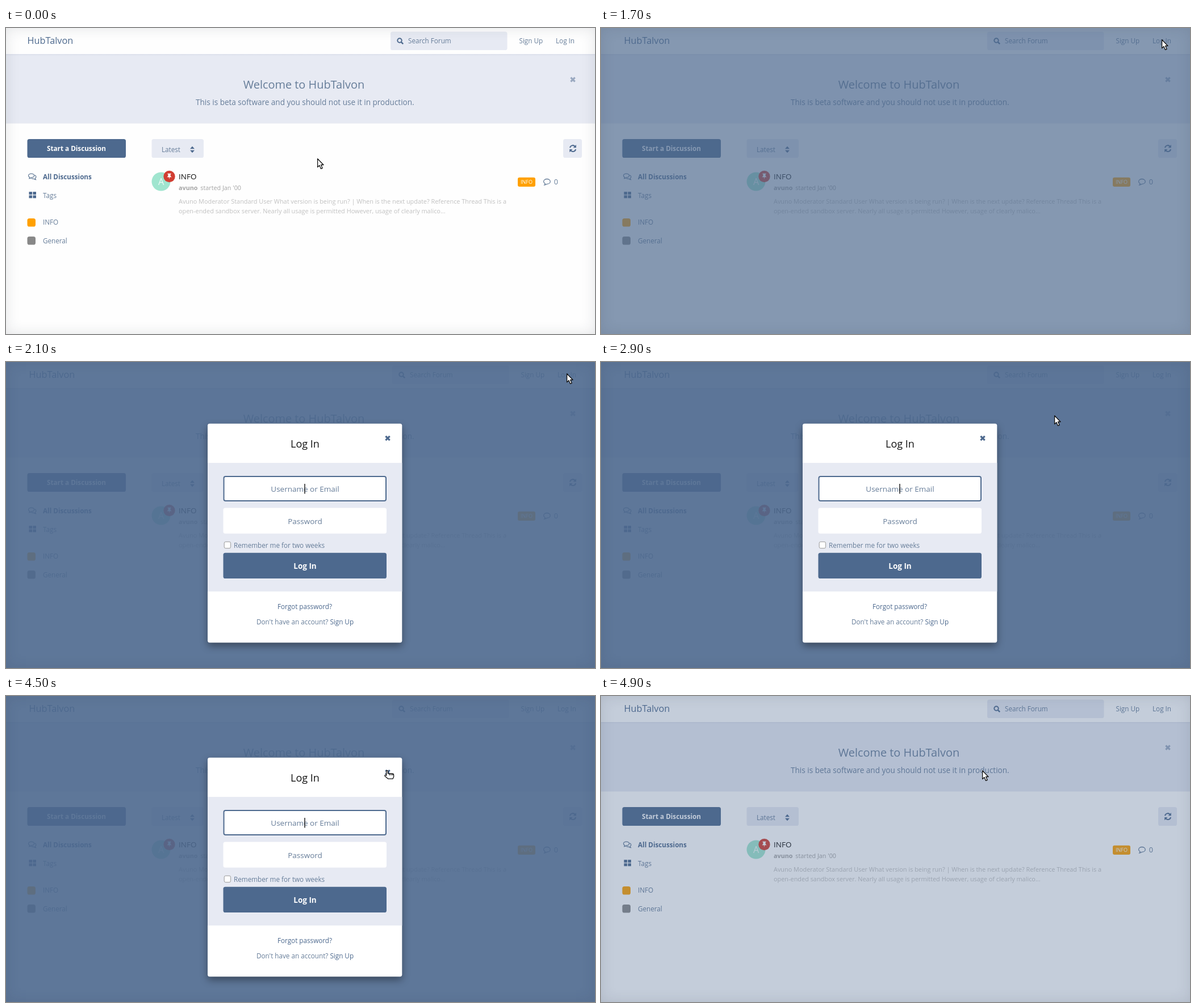
An HTML page that plays this animation: 1037 px wide and 540 px high, repeating every 5 s.

```html
<!DOCTYPE html>
<html lang="en">
<head>
<meta charset="utf-8">
<title>Forum log in</title>
<style>
html, body { margin: 0; width: 100%; height: 100%; overflow: hidden; background: #fefefe }
svg { position: absolute; left: 0; top: 0; width: 1037px; height: 540px }
#edge { position: absolute; left: 0; top: 0; width: 1037px; height: 540px; box-shadow: inset 0 0 24px rgba(35,45,60,.12) }
text { font: 11.7px "Open Sans", sans-serif; fill: #667d99 }
.b { font-weight: 700 }
.m { text-anchor: middle }
.p { fill: #4d698e }
.w { fill: #fff }
.k { fill: #111 }
.s { font-size: 10.8px; fill: #a4a4a4 }
.x { font-size: 10.9px; fill: #c1c1c1 }
.l { font-size: 13.5px }
.c { fill: #e7eaf3 }
.line { fill: none; stroke: #667d99; stroke-width: 1.3 }
#modal { transform-origin: 526px 302px }
#card { filter: drop-shadow(0 6px 7px rgba(0,0,0,.38)) }
</style>
</head>
<body>
<svg viewBox="0 0 1037 540">
  <defs>
    <path id="times" d="M-3.6-3.6 3.6 3.6M3.6-3.6-3.6 3.6" stroke="#4d698e" stroke-width="3.2"/>
    <linearGradient id="under" x2="0" y2="1">
      <stop stop-color="#405070" stop-opacity=".08"/><stop offset="1" stop-color="#405070" stop-opacity="0"/>
    </linearGradient>
  </defs>

  <rect class="c" y="46" width="1037" height="122.5"/>
  <rect y="46" width="1037" height="3" fill="url(#under)"/>
  <g id="head">
    <text class="p" x="37.5" y="28" style="font-size:16.3px">HubTalvon</text>
    <rect class="c" x="677" y="6.5" width="205.5" height="32.5" rx="3.6"/>
    <circle cx="693" cy="22" r="3.7" fill="none" stroke="#4d698e" stroke-width="2"/>
    <path d="M695.8 24.8l3.4 3.4" stroke="#4d698e" stroke-width="2.4"/>
    <text x="708" y="27.3">Search Forum</text>
    <text x="903.5" y="27.3">Sign Up</text>
    <text x="968" y="27.3">Log In</text>
  </g>
  <text x="417.8" y="106.5" style="font-size:19.9px">Welcome to HubTalvon</text>
  <text x="334" y="136" style="font-size:13.55px">This is beta software and you should not use it in production.</text>
  <use href="#times" x="998" y="91" opacity=".5"/>

  <rect class="p" x="37.5" y="196" width="173.5" height="33" rx="3.6"/>
  <text class="b m w" x="124" y="217">Start a Discussion</text>
  <path class="line" d="M41 265.5q.6-1 .8-2q-2.2-1-2.2-3c0-2 2.4-3.4 5-3.4s5 1.4 5 3.4-2.4 3.4-5 3.4q-1.6 1.4-3.6 1.6zM50.5 259.6q2.4 1 2.4 3.1 0 1.6-1.6 2.6 0 1 1 2.2-2 0-3.6-1.4-2.4.2-4-.7"/>
  <text class="b p" x="65" y="267.4">All Discussions</text>
  <path class="p" d="M40.5 289h5.6v5h-5.6zM47.4 289h5.6v5h-5.6zM40.5 295.3h5.6v5h-5.6zM47.4 295.3h5.6v5h-5.6z"/>
  <text x="65" y="300.4">Tags</text>
  <rect x="37.5" y="336" width="14.5" height="14.5" rx="3.6" fill="#ffa000"/>
  <text x="65" y="347.4">INFO</text>
  <rect x="37.5" y="368" width="14.5" height="14.5" rx="3.6" fill="#888"/>
  <text x="65" y="380.4">General</text>

  <rect class="c" x="256.5" y="196" width="91.5" height="33" rx="3.6"/>
  <text x="274" y="218.7">Latest</text>
  <path class="p" d="M324 213.3h8l-4-4.5zM324 215.7h8l-4 4.5z"/>
  <rect class="c" x="981" y="196" width="33" height="33" rx="3.6"/>
  <path d="M993 211.2a5 5 0 0 1 8.6-2.4M1003 214a5 5 0 0 1-8.6 2.4" fill="none" stroke="#4d698e" stroke-width="2"/>
  <path class="p" d="M1003.8 206v5.3h-5.3zM992.2 219.2v-5.3h5.3z"/>

  <circle cx="273" cy="271" r="16.5" fill="#a0e5cf"/>
  <text class="m w" x="273" y="277" style="font-size:16.2px;opacity:.85">A</text>
  <circle cx="287.5" cy="262" r="10.2" fill="#d13e32"/>
  <path class="w" d="M284.5 256.8h6v1.2h-.9v3l1.9 2.3h-3.4l-.6 4-.6-4h-3.4l1.9-2.3v-3h-.9z"/>
  <text class="k l" x="304" y="267">INFO</text>
  <text class="s" x="304" y="286"><tspan class="b">avuno</tspan><tspan x="342.3">started Jan '00</tspan></text>
  <text class="x" x="304" y="310">Avuno Moderator Standard User What version is being run? | When is the next update? Reference Thread This is a</text>
  <text class="x" x="304" y="326.5">open-ended sandbox server. Nearly all usage is permitted However, usage of clearly malico...</text>
  <rect x="901" y="263.7" width="31" height="16.3" rx="3" fill="#ffa000"/>
  <text class="m w" x="916.5" y="275.2" style="font-size:9px">INFO</text>
  <path class="line" d="M948 277q1.2-1.2 1.2-2.4-2.6-1.3-2.6-3.7c0-2.6 2.6-4.4 5.8-4.4s5.8 1.8 5.8 4.4-2.6 4.4-5.8 4.4q-2 1.6-4.4 1.7z"/>
  <text x="964.7" y="276" style="font-size:12.6px">0</text>

  <rect id="shade" class="p" width="1037" height="540"/>

  <g id="modal">
    <rect id="card" class="w" x="355" y="108.7" width="342.3" height="386.5" rx="3.6"/>
    <rect class="c" x="355" y="178" width="342.3" height="227"/>
    <text class="m k" x="526.5" y="150.5" style="font-size:18px">Log In</text>
    <use href="#times" x="672" y="134.5"/>
    <rect class="w" x="382.5" y="201" width="287.5" height="45" rx="3.6"/>
    <rect id="focus" x="383.5" y="202" width="285.5" height="43" rx="3" fill="none" stroke="#4d698e" stroke-width="2"/>
    <text class="m l" x="526.5" y="229">Username or Email</text>
    <path id="caret" d="M526 215v17.5" stroke="#111" stroke-width="1.4"/>
    <rect class="w" x="382.5" y="257.5" width="287.5" height="45.3" rx="3.6"/>
    <text class="m l" x="526.5" y="285.5">Password</text>
    <rect class="w" x="384.2" y="317.3" width="11.4" height="11.4" rx="2.5" stroke="#999"/>
    <text x="401" y="327.5">Remember me for two weeks</text>
    <rect class="p" x="382.5" y="336.7" width="287.5" height="45.3" rx="3.6"/>
    <text class="b m w l" x="526.5" y="364.8">Log In</text>
    <text class="m p" x="526" y="436">Forgot password?</text>
    <text class="m" x="526.5" y="463.3">Don't have an account? <tspan class="p">Sign Up</tspan></text>
  </g>
</svg>
<div id="edge"></div>
<svg viewBox="0 0 1037 540">
  <g id="cursor" stroke="#111" stroke-width="1.3" stroke-linejoin="round" fill="#fff">
    <path id="arrow" d="M.6.8V15.5l3.3-3 2.6 5.9 2.6-1.1-2.5-5.8h4.4z"/>
    <path id="hand" d="M-2 2.2q0-1.7 1.4-1.7t1.4 1.7V5.8h7.4q2.8 0 2.8 2.6v3.4l-1.6 3.4h-8.2l-5.8-5q-.6-2.2 1.6-1.7l1.2.8zM3.6 6v3M6.4 6v3M9 6.4v2.6"/>
  </g>
</svg>
<script>
const el = id => document.getElementById(id);

// Keyframes: time, then values; smooth eases each span.
function at(keys, t, smooth) {
  let i = 0;
  while (i < keys.length - 2 && t >= keys[i + 1][0]) i++;
  const [a, b] = [keys[i], keys[i + 1]];
  let u = Math.min(1, Math.max(0, (t - a[0]) / (b[0] - a[0])));
  if (smooth) u = u * u * (3 - 2 * u);
  return a.slice(1).map((v, n) => v + (b[n + 1] - v) * u);
}

const path = [[0, 548, 230], [600, 936, 54], [1200, 987, 20], [2200, 987, 20],
  [2900, 798, 94], [3100, 798, 94], [3700, 683, 126], [4100, 672, 131], [5000, 671, 131]];
const shade = [[1600, 0], [1700, .68], [1800, .88], [1900, .9], [4700, .9], [4800, .65], [4900, .33], [5000, 0]];
const modal = [[1700, 0, .9], [1800, .05, .906], [1900, .55, .96], [2000, .93, .99], [2100, 1, 1],
  [4600, 1, 1], [4700, .5, .95], [4800, 0, .9]];
const show = (id, on) => el(id).style.display = on ? "" : "none";

function draw() {
  const t = Math.floor(performance.now() % 5000 / 100) * 100;
  const [x, y] = at(path, t, true);
  const [fade, scale] = at(modal, t);
  const hand = t >= 1200 && t < 1700 || t >= 4000 && t < 4700;
  el("cursor").setAttribute("transform", `translate(${x} ${y})`);
  show("hand", hand);
  show("arrow", !hand);
  el("head").setAttribute("transform", `translate(${t >= 1700 ? 3 : 0})`);
  el("shade").style.opacity = at(shade, t)[0];
  el("modal").style.opacity = fade;
  el("modal").style.transform = `scale(${scale})`;
  show("focus", t >= 2100);
  show("caret", t >= 2100 && t < 3400 || t >= 4500);
  requestAnimationFrame(draw);
}
draw();
</script>
</body>
</html>
```
